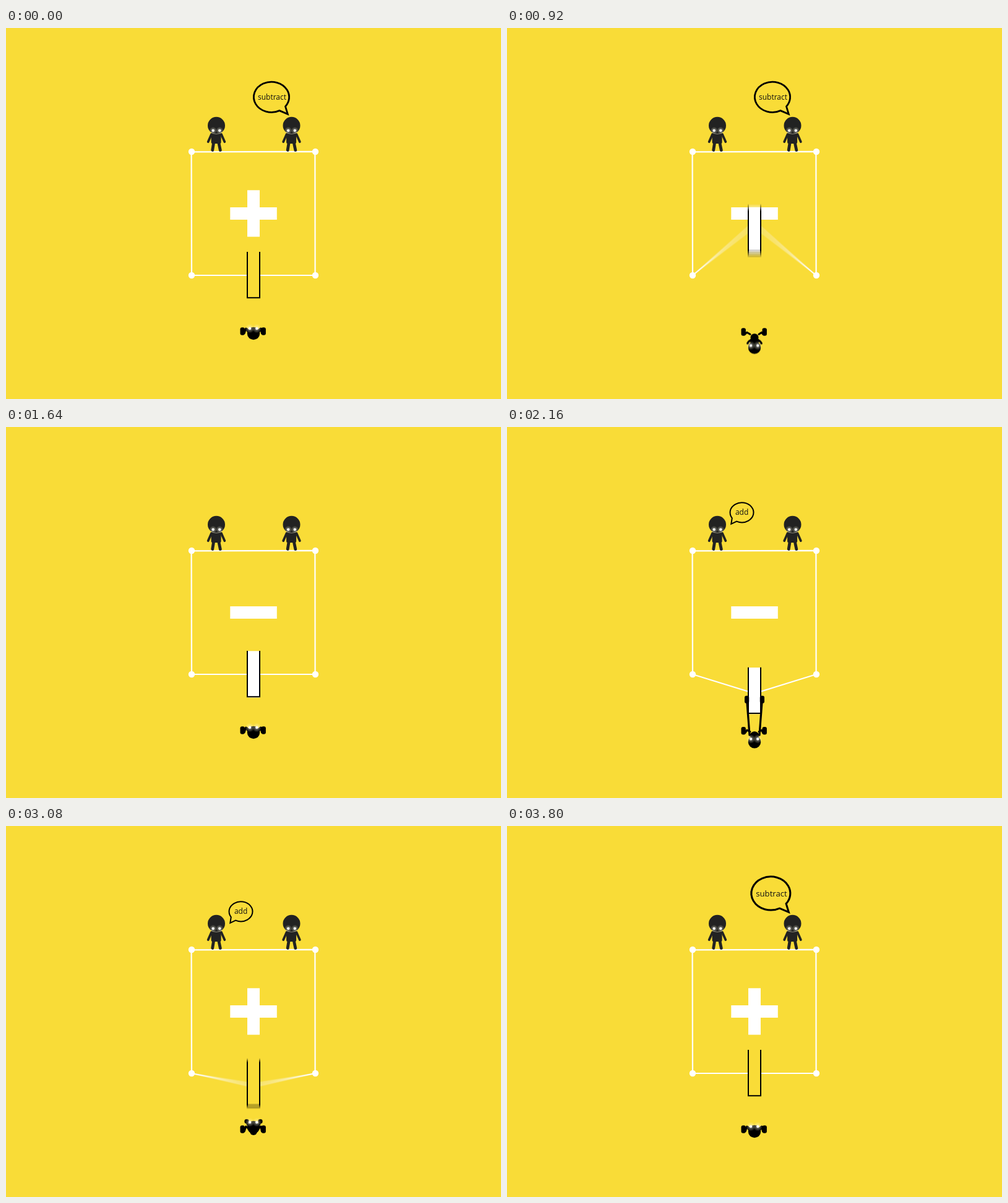
An HTML page with a canvas that plays this animation: 800x600 px, repeating every 3840 ms.

```html
<!DOCTYPE html>
<html lang="en">
<head>
<meta charset="utf-8">
<title>Add and subtract</title>
<style>
  html, body { margin: 0; width: 100%; height: 100%; overflow: hidden; background: #f9dc37; }
  canvas { display: block; }
</style>
</head>
<body>
<canvas id="stage" width="800" height="600"></canvas>
<script>
const LOOP = 3840, STEP = 40, SHUTTER = 17, SAMPLES = 9;
const CATCH = 840, DROP = 2760;
const BG = '#f9dc37', INK = '#222';

const out = document.getElementById('stage').getContext('2d');
const layer = document.createElement('canvas');
layer.width = 800;
layer.height = 600;
const ctx = layer.getContext('2d');

const clamp = v => Math.max(0, Math.min(1, v));
const mix = (a, b, k) => a + (b - a) * k;
const sine = k => (1 - Math.cos(Math.PI * k)) / 2;
const quad = k => k * k;

// Value of a keyed track: [time, value, easing into this key]
function track(keys, t) {
  if (t <= keys[0][0]) return keys[0][1];
  for (let i = 1; i < keys.length; i++) {
    const [t1, v1, ease = sine] = keys[i];
    if (t < t1) {
      const [t0, v0] = keys[i - 1];
      return mix(v0, v1, ease((t - t0) / (t1 - t0)));
    }
  }
  return keys[keys.length - 1][1];
}

const later = keys => keys.map(([t, ...rest]) => [t + LOOP / 2, ...rest]);

const settle = [[1100, 30], [1260, -12], [1380, 5], [1480, -2], [1560, 0]];
const SLOT = [
  [80, 0], [500, 51], [700, 51], [CATCH, -100, quad], ...settle,
  [1660, 0], [1840, 22], [2360, 29], [2480, 33], [2600, 29], [2640, 29],
  [DROP, -100, quad], ...later(settle)
];

const recover = [[1000, 512], [1150, 487], [1210, 489], [1360, 494]];
const HEAD = [
  [80, 494], [500, 538], [720, 538], ...recover,
  [1650, 494], [1840, 506], [2360, 511], [2500, 515.5], [2640, 510],
  ...later(recover)
];

const GRIP = [[0, 0], [110, 1], [705, 1], [790, 0], [1640, 0], [1730, 1], [2650, 1], [2720, 0]];

const raise = [[1040, 0], [1150, 1], [1210, 0.8], [1340, 0]];
const REACH = [...raise, ...later(raise)];

const SUBTRACT = [[1500, 1], [1630, 0], [3725, 0], [3760, 0.6], [3800, 1.1], [3830, 1]];
const ADD = [[1805, 0], [1840, 0.6], [1880, 1.1], [1915, 1], [3430, 1], [3555, 0]];

function pose(time) {
  const t = (time + LOOP) % LOOP;
  const slot = track(SLOT, t);
  const loaded = t >= CATCH && t < DROP;
  const lead = 2.5 * clamp((t - 2620) / 30);
  return {
    slot,
    bar: loaded ? Math.max(-100, slot - lead) : -100,
    head: track(HEAD, t),
    grip: track(GRIP, t),
    reach: track(REACH, t),
    subtract: track(SUBTRACT, t),
    add: track(ADD, t)
  };
}

function line(points, width, color) {
  ctx.beginPath();
  points.forEach(([x, y]) => ctx.lineTo(x, y));
  ctx.lineWidth = width;
  ctx.strokeStyle = color;
  ctx.stroke();
}

function oval(x, y, rx, ry, color) {
  ctx.beginPath();
  ctx.ellipse(x, y, rx, ry, 0, 0, Math.PI * 2);
  ctx.fillStyle = color;
  ctx.fill();
}

function pad(x, y, w, h, r, color) {
  ctx.beginPath();
  ctx.roundRect(x - w / 2, y - h / 2, w, h, r);
  ctx.fillStyle = color;
  ctx.fill();
}

function eye(x, y, size, glow) {
  const g = ctx.createRadialGradient(x, y, 0, x, y, glow);
  g.addColorStop(0, 'rgba(255,255,255,.85)');
  g.addColorStop(0.4, 'rgba(255,255,240,.35)');
  g.addColorStop(1, 'rgba(255,250,200,0)');
  oval(x, y, glow, glow, g);
  oval(x, y, size, size, '#fff');
}

function watcher(x) {
  ctx.lineCap = 'round';
  for (const s of [-1, 1]) {
    line([[x + s * 8, 172], [x + s * 13.3, 184]], 3.8, INK);
    line([[x + s * 4 - 0.3, 185], [x + s * 6.3, 197.5]], 4.8, INK);
  }
  pad(x - 0.4, 178.5, 16, 17, 2, INK);
  oval(x, 157.8, 14, 14, INK);
  ctx.beginPath();
  ctx.arc(x, 157.8, 13.8, 0.9, Math.PI - 0.9);
  ctx.lineWidth = 0.8;
  ctx.strokeStyle = 'rgba(255,250,220,.6)';
  ctx.stroke();
  for (const s of [-1, 1]) eye(x + s * 5.3, 165.8, 2.1, 6);
  ctx.lineCap = 'butt';
}

function bubble(b, scale) {
  if (scale < 0.02) return;
  ctx.save();
  ctx.translate(b.tip[0], b.tip[1]);
  ctx.scale(scale, scale);
  ctx.translate(-b.tip[0], -b.tip[1]);
  ctx.beginPath();
  ctx.ellipse(b.x, b.y, b.rx, b.ry, 0, b.to, b.from + Math.PI * 2);
  ctx.lineTo(b.tip[0], b.tip[1]);
  ctx.closePath();
  ctx.lineWidth = b.width;
  ctx.strokeStyle = '#000';
  ctx.stroke();
  ctx.font = '12px "Open Sans", "Noto Sans", sans-serif';
  ctx.textAlign = 'center';
  ctx.fillStyle = '#111';
  ctx.fillText(b.text, b.textX, b.textY);
  ctx.restore();
}

const SAY_SUBTRACT = {
  text: 'subtract', x: 429, y: 111.7, rx: 28.6, ry: 24.6, from: 0.665, to: 1.1,
  tip: [455.3, 139.3], width: 2.8, textX: 430, textY: 116
};
const SAY_ADD = {
  text: 'add', x: 379.5, y: 138.3, rx: 19, ry: 16, from: 2.025, to: 2.546,
  tip: [362.3, 156.8], width: 2, textX: 379.6, textY: 142.3
};

function frame(slot) {
  const y = 400 + slot * 1.04;
  line([[390, y], [300, 400], [299.6, 200.3], [499.4, 199.9], [499.6, 400], [410, y]], 2.2, '#fff');
  for (const x of [300, 500])
    for (const cy of [200, 400]) oval(x, cy, 5.2, 5.2, '#fff');
}

function puller(p) {
  const head = p.head;
  const lean = clamp((head - 494) / 44);
  const open = Math.min(1, lean * 3);
  const hip = 494 + 12 * lean;
  const shoulder = head - 2 - 9 * open;
  const handY = mix(head - 7 - 2.5 * p.reach, 414 + p.slot, p.grip);
  const handX = mix(11, 12.4, p.grip);
  const footY = 490.5 + 2 * lean;
  ctx.lineCap = ctx.lineJoin = 'round';

  for (const s of [-1, 1]) {
    const elbow = [400 + s * 9.8, mix(handY, shoulder, 0.58)];
    line([[400 + s * 8, shoulder], elbow, [400 + s * handX, handY]], 3.2, '#000');
    line([
      [399.3 + s * 14, footY + 3],
      [399.7 + s * 12, 486 + 12 * lean],
      [400 + s * 7, mix(490, hip, lean)]
    ], 3, '#000');
    pad(399.2 + s * 17, footY, 7.4, 12.5, 3, '#000');
    const wide = Math.max(p.grip, p.reach);
    pad(400 + s * handX, handY, 3 + 4.2 * wide, 3 + 9.2 * p.grip + 4 * p.reach, 2.5 * wide + 0.5, '#000');
  }

  oval(400, hip, 6 + open * (1 - lean), 6, '#000');
  ctx.beginPath();
  ctx.moveTo(395, hip);
  ctx.lineTo(405, hip);
  ctx.lineTo(408, shoulder);
  ctx.lineTo(392, shoulder);
  ctx.fillStyle = '#000';
  ctx.fill();
  oval(400, shoulder, 7 + 3 * lean, 4.5, '#000');
  oval(400, head, 10.2, 10.2, '#000');
  for (const s of [-1, 1]) eye(399.7 + s * 5.6, head - 8 + 9 * lean, 2.1, 7.5);
  ctx.lineCap = 'butt';
  ctx.lineJoin = 'miter';
}

function scene(p) {
  ctx.fillStyle = BG;
  ctx.fillRect(0, 0, 800, 600);
  frame(p.slot);
  watcher(340);
  watcher(461.5);
  bubble(SAY_SUBTRACT, p.subtract);
  bubble(SAY_ADD, p.add);

  ctx.fillStyle = '#fff';
  ctx.fillRect(362.3, 290, 75.5, 20);
  ctx.fillRect(390, 362.3 + p.bar, 20, 75.3);
  const top = 362 + p.slot, bottom = 436.3 + p.slot;
  line([[390, top], [390, bottom], [410, bottom], [410, top]], 2, '#000');
  puller(p);
}

// Average several poses across the shutter when something moves
function draw(t) {
  const a = Object.values(pose(t - SHUTTER / 2));
  const b = Object.values(pose(t + SHUTTER / 2));
  const moving = a.some((v, i) => Math.abs(v - b[i]) > 0.15);
  const count = moving ? SAMPLES : 1;
  for (let i = 0; i < count; i++) {
    const shift = count > 1 ? (i / (count - 1) - 0.5) * SHUTTER : 0;
    scene(pose(t + shift));
    out.globalAlpha = 1 / (i + 1);
    out.drawImage(layer, 0, 0);
  }
}

const start = performance.now();
let shown = -1;
function tick() {
  const t = Math.floor(((performance.now() - start) % LOOP) / STEP) * STEP;
  if (t !== shown) {
    draw(t);
    shown = t;
  }
  requestAnimationFrame(tick);
}
tick();
</script>
</body>
</html>
```
